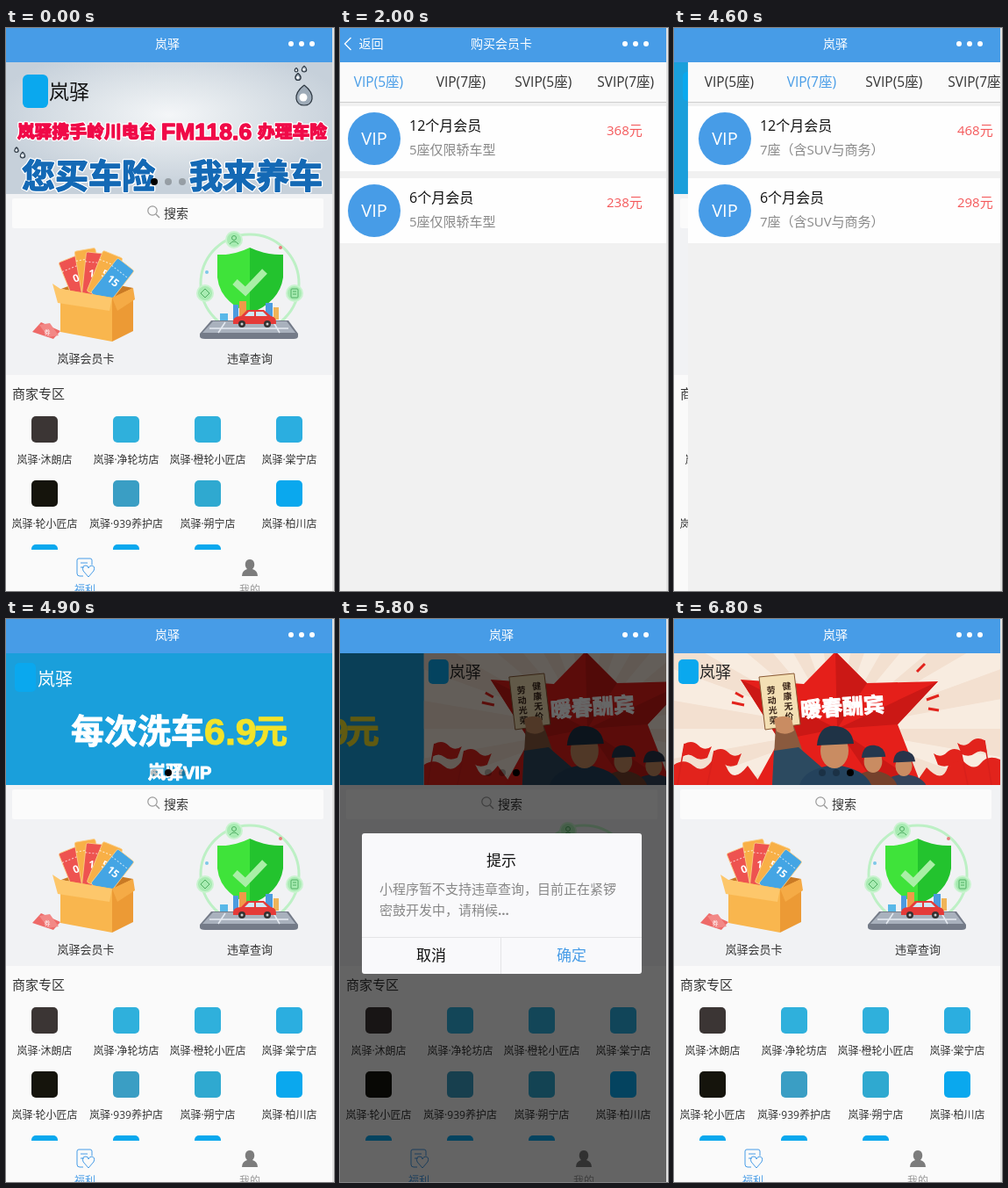
Write an HTML page that moves like this. It is 374 px wide and 641 px high and loops after 7600 ms.

```html
<!DOCTYPE html>
<html lang="zh-CN">
<head>
<meta charset="utf-8">
<title>岚驿</title>
<style>
  html, body { margin: 0; width: 100%; height: 100%; overflow: hidden; background: #fafafa; }
  svg { display: block; width: 100vw; height: 100vh; }
  text { font-family: "Open Sans", "Noto Sans CJK SC", "Noto Sans CJK", sans-serif; white-space: pre; }
  .heavy { font-family: "Liberation Sans", "Noto Sans CJK SC", "Noto Sans CJK", sans-serif;
    font-weight: 900; paint-order: stroke; stroke-linejoin: round; }
</style>
</head>
<body>
<svg id="stage" viewBox="0 0 374 641"></svg>
<script>
const LOOP = 7600, STEP = 100, W = 372;
const BLUE = '#479ce7', SKY = '#0aa8ee';

// --- markup helpers ---
const rect = (x, y, w, h, fill, r = 0, more = '') =>
  `<rect x="${x}" y="${y}" width="${w}" height="${h}" rx="${r}" fill="${fill}" ${more}/>`;
const circle = (x, y, r, fill, more = '') =>
  `<circle cx="${x}" cy="${y}" r="${r}" fill="${fill}" ${more}/>`;
const path = (d, fill, more = '') => `<path d="${d}" fill="${fill}" ${more}/>`;
const line = (d, color, w = 1, more = '') =>
  path(d, 'none', `stroke="${color}" stroke-width="${w}" ${more}`);
const text = (x, y, s, size, fill, more = '') =>
  `<text x="${x}" y="${y}" font-size="${size}" fill="${fill}" ${more}>${s}</text>`;
const mid = (x, y, s, size, fill, more = '') =>
  text(x, y, s, size, fill, 'text-anchor="middle" ' + more);
const group = (id, body, more = '') => `<g id="${id}" ${more}>${body}</g>`;
const heavy = (x, y, s, size, fill, edge = fill, w = 1) =>
  text(x, y, s, size, fill, `class="heavy" stroke="${edge}" stroke-width="${w}"`);
const outlined = (x, y, s, size, fill) => heavy(x, y, s, size, fill, '#fff', 4) + heavy(x, y, s, size, fill, fill, 1.4);

// --- banners, each drawn at x = 0 ---
const drop = (x, y, r) =>
  path(`M${x} ${y - r * 1.3}C${x + r * 1.4} ${y - r * .2} ${x + r} ${y + r} ${x} ${y + r}` +
    `S${x - r * 1.4} ${y - r * .2} ${x} ${y - r * 1.3}`, '#9eabb8', 'stroke="#2c3640" stroke-width="1.2"') +
  circle(x - r * .1, y + r * .1, r * .45, '#fff');

const insurance = () =>
  rect(0, 39, W, 150, 'url(#steel)') +
  drop(340, 78, 10) + drop(333, 56, 3.5) + drop(340, 47, 3) + drop(331, 48, 2) +
  drop(12, 139, 2.5) + drop(19, 145, 3) +
  rect(19, 53, 29, 38, SKY, 6) + text(49, 81, '岚驿', 23, '#111') +
  outlined(13, 125, '岚驿携手岭川电台', 19.8, '#f00a48') +
  outlined(177, 127, 'FM118.6', 26.5, '#f00a48') +
  outlined(287, 125, '办理车险', 19.8, '#f00a48') +
  outlined(18, 182, '您买车险', 38, '#1469b5') +
  outlined(209, 182, '我来养车', 38, '#1469b5');

const wash = () =>
  rect(0, 39, W, 150, '#1a9fdb') +
  rect(10, 50, 24, 33, SKY, 5) + text(36, 76, '岚驿', 20, '#fff') +
  heavy(74, 141, '每次洗车', 38, '#fff') +
  heavy(226, 143, '6.9', 43, '#f2e32a') + heavy(283, 141, '元', 38, '#f2e32a') +
  heavy(162, 182, '岚驿VIP', 20, '#fff');

const worker = (x, y, r, coat, cap) =>
  path(`M${x - r * 2} 189Q${x - r * 1.7} ${y + r} ${x} ${y + r * .8}Q${x + r * 1.7} ${y + r} ${x + r * 2.1} 189Z`, coat) +
  `<ellipse cx="${x}" cy="${y}" rx="${r * .8}" ry="${r}" fill="#c98c62"/>` +
  path(`M${x - r} ${y - r * .3}Q${x - r * .9} ${y - r * 1.5} ${x + r * .1} ${y - r * 1.4}` +
    `Q${x + r} ${y - r * 1.3} ${x + r * 1.1} ${y - r * .4}Z`, cap);

const column = (x, y, s) => [...s].map((c, i) => mid(x, y + i * 11.5, c, 10, '#3a2418', 'font-weight="700"')).join('');

const flag = (x, y, s) =>
  line(`M${x} 189L${x + s * 8} ${y}`, '#d8201c', 1.5) +
  path(`M${x + s * 8} ${y}q${s * 9} -5 ${s * 16} 2t${s * 15} 1l${-s * 5} 13q${-s * 9} 4 ${-s * 15} -1t${-s * 14} 0Z`, '#e2231c');

const rays = () => {
  let s = '';
  for (let i = 0; i < 18; i++) {
    const a = i * Math.PI / 9, p = d => `${186 + 260 * Math.cos(a + d)} ${125 + 260 * Math.sin(a + d)}`;
    s += path(`M186 125L${p(0)}L${p(.17)}Z`, '#f3e0d0');
  }
  return `<g clip-path="url(#frame)">${s}</g>`;
};

const spring = () =>
  rect(0, 39, W, 150, '#f8ece0') + rays() +
  path('M0 189V166q12 -8 22 1t20 -4t18 6t24 -2l16 22Z', '#e2231c') +
  path('M372 189V160q-14 -6 -22 4t-20 -2t-18 7t-24 0l-14 20Z', '#e2231c') +
  flag(4, 142, 1) + flag(38, 150, 1) + flag(362, 138, -1) + flag(335, 150, -1) +
  path('M184 37L220 73L301 71L255 120L282 189H92L120 138L76 69L148 74Z', '#e51f1a') +
  path('M184 37L220 73L186 125Z M301 71L255 120L186 125Z M282 189H230L186 125Z M120 138L76 69L186 125Z', '#cb1815') +
  line('M66 95l14 3M70 84l9 5M288 92l14 -5M290 102l12 2M277 60l9 -9', '#e2231c', 3) +
  worker(262, 167, 12, '#34435a', '#27344a') + worker(227, 162, 13, '#75412c', '#24384e') +
  path('M112 189L116 122L136 120L150 160L172 172V189Z', '#8a5a3e') +
  path('M112 189L114 150L142 146L172 172V189Z', '#2c4a60') +
  worker(183, 150, 20, '#24425c', '#1f3346') +
  path('M97 66L137 62L144 120L104 126Z', '#f3dfb4', 'stroke="#8a5a34" stroke-width="1"') +
  `<g transform="rotate(-5 120 95)">${column(130, 81, '健康无价')}${column(112, 84, '劳动光荣')}</g>` +
  path('M114 114q9 -6 20 -1l3 14q-10 7 -20 1Z', '#c98c62') +
  `<g transform="rotate(-4 190 100)">${heavy(144, 109, '暖春酬宾', 24, '#fff')}</g>` +
  rect(5, 46, 23, 28, SKY, 5) + text(29, 67, '岚驿', 18, '#222');

// --- home page ---
const ticket = (x, y, a, fill, s) =>
  `<g transform="translate(${x} ${y}) rotate(${a})">` +
  rect(-12, -24, 24, 50, fill, 2, 'stroke="#fbd08a" stroke-width=".8"') +
  line('M-12 -13H12', '#fff', 1, 'stroke-dasharray="2 2" opacity=".7"') +
  mid(0, 4, s, 12, '#fff', 'font-weight="700"') + '</g>';

const giftBox = () =>
  path('M63 297L92 286L145 296L121 308Z', '#c97a25') +
  ticket(80, 285, -22, '#ee5350', '0') + ticket(94, 276, -10, '#f8b047', '5') +
  ticket(101, 280, 6, '#ee5350', '10') + ticket(113, 280, 22, '#f8b047', '5') +
  ticket(122, 288, 38, '#44a5e4', '15') +
  path('M62 297L121 307V357L62 346Z', '#f9b64e') + path('M121 307L145 296V345L121 357Z', '#ec9a35') +
  path('M62 297L53 291L59 313L118 322L121 307Z', '#fdc76b') +
  path('M121 307L145 296L147 309L127 322Z', '#f5ab46') +
  path('M30 346L40 335L62 345L54 354Z', '#ee6a68') + path('M38 338L50 336L60 350L48 352Z', '#f28886') +
  mid(47, 349, '券', 7, '#fff');

const node = (x, y) => circle(x, y, 10, '#c9f3cf') + circle(x, y, 8, '#a8ebb2');

const shield = () =>
  circle(278, 291, 56, 'none', 'stroke="#bdf0c5" stroke-width="3"') +
  node(260, 241) + node(227, 302) + node(329, 302) +
  circle(260, 239, 2.5, 'none', 'stroke="#4fae62"') + line('M255 246q5 -6 10 0', '#4fae62') +
  path('M227 297l5 5l-5 5l-5 -5Z', 'none', 'stroke="#4fae62"') + rect(325, 297, 8, 10, 'none', 1, 'stroke="#4fae62"') +
  line('M327 300h4M327 303h4', '#4fae62') +
  circle(313, 250, 2, '#e87d7d') + circle(229, 278, 2, '#7dc8e8') +
  path('M278 250Q260 259 241 258V284Q244 312 278 325Z', '#3fe33a') +
  path('M278 250Q297 259 316 258V284Q312 312 278 325Z', '#23c32e') +
  line('M261 289L273 300L295 277', '#a9efa6', 8) +
  path('M234 333H322L333 348V351Q333 354 328 354H227Q221 354 221 351V348Z', '#747b88') +
  path('M236 334H320L330 347H224Z', '#a9b1bd') + line('M232 342H322M250 335L242 347M305 335L312 347', '#e6ebf2', 1.5) +
  rect(259, 315, 6, 17, '#4c9be0') + rect(266, 311, 8, 21, '#f09a48') + rect(296, 313, 8, 18, '#4c9be0') +
  rect(305, 318, 6, 14, '#f0b458') + rect(244, 325, 9, 8, '#59b8e8') +
  path('M259 336Q258 328 268 328L275 321H294L302 328Q309 329 308 337H259Z', '#e53a38') +
  path('M272 328L277 323H283V328ZM285 323H293L298 328H285Z', '#cfe9f7') +
  circle(269, 337, 4, '#333') + circle(298, 337, 4, '#333') + circle(269, 337, 1.5, '#ccc') + circle(298, 337, 1.5, '#ccc');

const SHOPS = [
  ['沐朗店', '#3b3534'], ['净轮坊店', '#2fb0dc'], ['橙轮小匠店', '#2fb0dc'], ['棠宁店', '#2baee0'],
  ['轮小匠店', '#15140c'], ['939养护店', '#3a9ec4'], ['朔宁店', '#2fa9d0'], ['柏川店', SKY],
  ['', SKY], ['', SKY], ['', SKY]
];

const shops = () => SHOPS.map(([name, fill], i) => {
  const x = 29 + i % 4 * 93, y = 442 + (i >> 2) * 73;
  return rect(x, y, 30, 30, fill, 5) + (name && mid(x + 15, y + 53.5, '岚驿·' + name, 12, '#333'));
}).join('');

const tabBar = () =>
  rect(0, 594, W, 47, '#fafafa') +
  line('M98 611V606Q98 604 96 604H83Q81 604 81 606V621Q81 624 84 624H88', BLUE, 1) +
  line('M85 609H93M85 614H89', BLUE, 1) +
  line('M94 625L88 618Q86 612 91 612Q94 612 94 615Q95 612 98 612Q102 613 100 618Z', BLUE, 1) +
  mid(90, 644, '福利', 12, BLUE) +
  path('M269 624Q269 618 275 616Q272 613 273 609Q274 605 278 605T283 609Q284 613 281 616Q287 618 287 624Z', '#7c7c7c') +
  mid(278, 644, '我的', 12, '#999');

const home = () =>
  rect(0, 39, W, 602, '#fafafa') + rect(0, 189, W, 206, '#f1f2f4') +
  `<g clip-path="url(#frame)">${group('s0', insurance())}${group('s1', wash())}${group('s2', spring())}</g>` +
  [0, 1, 2].map(i => circle(169 + i * 16, 175, 4, '#000', `id="dot${i}"`)).join('') +
  rect(7, 194, 355, 34, '#fbfbfb', 2) +
  circle(167, 208, 5.2, 'none', 'stroke="#999" stroke-width="1.2"') + line('M171 212L175 216', '#999', 1.4) +
  text(180, 216, '搜索', 14, '#333') +
  giftBox() + shield() +
  mid(91, 381, '岚驿会员卡', 13, '#333') + mid(278, 381, '违章查询', 13, '#333') +
  text(7, 422, '商家专区', 15, '#333') + shops() + tabBar();

// --- membership page ---
const TABS = ['VIP(5座)', 'VIP(7座)', 'SVIP(5座)', 'SVIP(7座)'];
const card = (y, title, id) =>
  rect(-3, y, W + 3, 74, '#fefefe') + circle(39, y + 37, 30, BLUE) + mid(39, y + 44, 'VIP', 20, '#fff') +
  text(79, y + 28, title, 16, '#111') + text(79, y + 55, '', 15, '#888', `id="note${id}"`) +
  text(304, y + 33, '', 15, '#f4585a', `id="price${id}"`);

const toast = () => {
  let s = rect(123, 177, 122, 122, '#343434', 4, 'opacity=".82"'), spokes = '';
  for (let i = 0; i < 12; i++)
    spokes += rect(-1.4, -15, 2.8, 8, '#fff', 1.4, `transform="rotate(${i * 30})" opacity="${.25 + i * .06}"`);
  return s + group('spin', spokes) + mid(184, 267, '加载中', 16, '#fff');
};

const shopPage = () =>
  group('blank', rect(-3, 39, W + 3, 356, '#f8f9fb') + rect(-3, 395, W + 3, 246, '#fafafa') + rect(0, 39, 27, 2, '#43b75c')) +
  group('plans',
    rect(-3, 39, W + 3, 602, '#f1f1f1') + rect(-3, 39, W + 3, 45, '#fafafa') + rect(-3, 84, W + 3, 1, '#cfcfcf') +
    TABS.map((s, i) => mid(44 + i * 93.9, 67, s, 15.5, '#333', `id="tab${i}"`)).join('') +
    group('cards', card(89, '12个月会员', 0) + card(171, '6个月会员', 1))) +
  group('toast', toast());

// --- dialog and header ---
const dialog = () =>
  rect(25, 244, 319, 160, '#f9f9fb', 3) + mid(184, 281, '提示', 17, '#111') +
  text(45, 313, '小程序暂不支持违章查询，目前正在紧锣', 15, '#888') +
  text(45, 337, '密鼓开发中，请稍候<tspan font-weight="700">...</tspan>', 15, '#888') +
  rect(25, 362, 319, 1, '#e4e4e6') + rect(183, 362, 1, 42, '#e4e4e6') +
  mid(104, 389, '取消', 17, '#111') + mid(264, 389, '确定', 17, BLUE);

const header = () =>
  rect(0, 0, W, 39, BLUE) + mid(184, 23, '', 14, '#fff', 'id="title"') +
  group('back', line('M12.5 11L5.5 18L12.5 25', '#fff', 1.3) + text(21.5, 23, '返回', 14, '#fff')) +
  [325, 337, 349].map(x => circle(x, 18, 3, '#fff')).join('');

const stage = document.getElementById('stage');
stage.innerHTML =
  `<defs><clipPath id="frame">${rect(0, 39, W, 150, '#000')}</clipPath>
  <radialGradient id="steel" cx=".5" cy=".4" r=".55"><stop stop-color="#f4f6f8"/><stop offset=".45" stop-color="#dfe5ea"/>
  <stop offset="1" stop-color="#c6d0da"/></radialGradient></defs>` +
  group('home', home()) + rect(0, 39, W, 602, '#000', 0, 'id="mask"') +
  group('dialog', dialog()) + group('page', shopPage()) + header() + rect(W, 0, 2, 641, '#e2e2e2');

// --- animation ---
const el = {};
stage.querySelectorAll('[id]').forEach(e => el[e.id] = e);
const show = (id, on) => el[id].setAttribute('display', on ? 'inline' : 'none');
const shift = (id, x) => el[id].setAttribute('transform', `translate(${x} 0)`);
const alpha = (id, a) => { show(id, a > 0); el[id].setAttribute('opacity', a); };
const ramp = (t, from, dur) => Math.min(1, Math.max(0, (t - from) / dur));
const ease = (p, n) => p < .5 ? (2 * p) ** n / 2 : 1 - (2 - 2 * p) ** n / 2;

function draw(t) {
  const pushed = t >= 900 && t < 4600;
  el.title.textContent = pushed ? '购买会员卡' : '岚驿';
  show('back', pushed);

  // banner carousel
  const pos = t < 1300 ? 0 : 1 + ease(ramp(t, 5220, 968), 3);
  const active = t < 1300 ? 0 : pos > 1 ? 2 : 1;
  for (let i = 0; i < 3; i++) {
    shift('s' + i, (i - pos) * W);
    el['dot' + i].setAttribute('opacity', i === active ? 1 : .25);
  }

  // page slides in from the right, then back out
  const x = W * (1 - ease(ramp(t, 850, 400), 2) + ease(ramp(t, 4543, 357), 2));
  show('page', t >= 900 && t < 4900);
  shift('page', x);
  show('blank', t < 1600);
  show('plans', t >= 1600);
  show('cards', t >= 1800);
  show('toast', t >= 1600 && t < 2000 || t >= 3400 && t < 3500);
  el.spin.setAttribute('transform', `translate(184 226) rotate(${t / 100 * 30 % 360})`);

  const seven = t >= 3500;
  TABS.forEach((_, i) => el['tab' + i].setAttribute('fill', i === +seven ? BLUE : '#333'));
  ['368', '238'].forEach((p, i) => {
    el['price' + i].textContent = (seven ? ['468', '298'][i] : p) + '元';
    el['note' + i].textContent = seven ? '7座（含SUV与商务）' : '5座仅限轿车型';
  });

  // dialog
  const leave = 1 - ramp(t, 6600, 200);
  alpha('mask', .6 * ramp(t, 5320, 300) * leave);
  alpha('dialog', ramp(t, 5300, 200) * leave);
}

const start = performance.now();
function tick() {
  const t = (performance.now() - start) % LOOP;
  draw(Math.floor(t / STEP) * STEP);
  requestAnimationFrame(tick);
}
tick();
</script>
</body>
</html>
```
